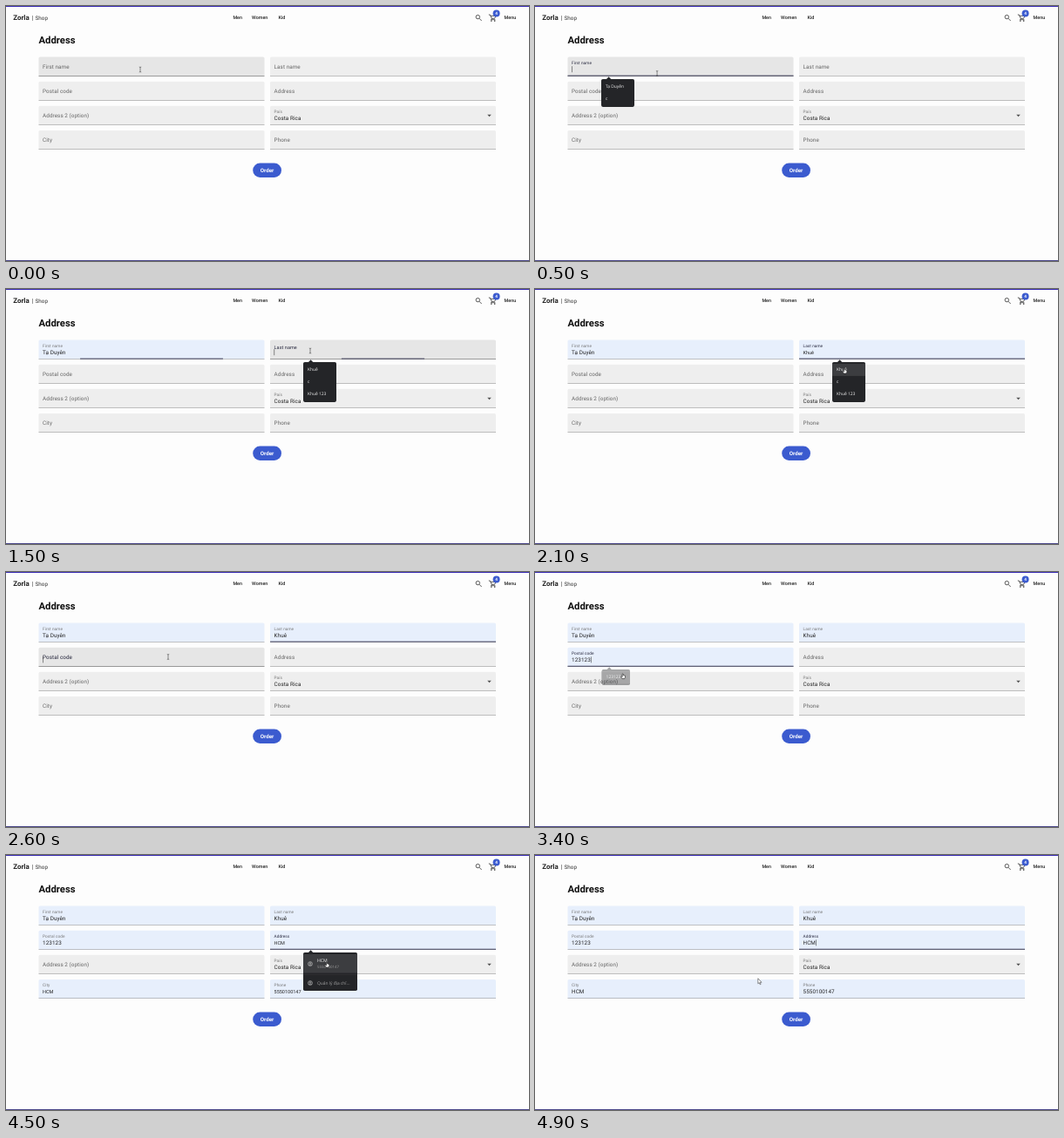
An HTML page that plays this animation: 600x293 px, repeating every 5 s.

```html
<!DOCTYPE html>
<html lang="en">
<head>
<meta charset="utf-8">
<title>Address form</title>
<style>
  html, body { margin: 0; width: 100%; height: 100%; overflow: hidden; background: #fdfdfd; }
  svg { display: block; width: 100%; height: 100%; text-rendering: geometricPrecision; }
  text { font-family: Roboto, Arial, sans-serif; white-space: pre; }
  .body { font-size: 6.3px; letter-spacing: .07px; }
  .preview { font-size: 5.5px; }
  .nav { font-size: 5.4px; font-weight: 500; fill: #222; }
  .menu text { font-family: "Open Sans", "Noto Sans", sans-serif; font-size: 4.9px; fill: #f1f1f1; }
</style>
</head>
<body>
<svg viewBox="0 0 600 293" xmlns="http://www.w3.org/2000/svg">
  <rect width="600" height="293" fill="#fdfdfd"/>
  <rect width="600" height="1" fill="#3a2db4"/>
  <rect y="292" width="600" height="1" fill="#4d4a8c"/>
  <text x="8.3" y="16.2" font-size="7.9" font-weight="700" fill="#222">Zorla</text>
  <text x="29.8" y="16" font-size="7" fill="#333">|</text>
  <text x="33.6" y="16" font-size="6.3" fill="#333">Shop</text>
  <g class="nav">
    <text x="260.4" y="15.4">Men</text>
    <text x="282" y="15.4">Women</text>
    <text x="312.6" y="15.4">Kid</text>
    <text x="571.6" y="15.4">Menu</text>
  </g>
  <g fill="none" stroke="#333" stroke-width=".8">
    <circle cx="541.3" cy="12.6" r="2.2"/>
    <path d="M543 14.3L545.7 17"/>
    <path d="M553.8 10H555.2L557.3 14.3H560.5L562 11.5M556 11.3H561M557.3 14.3L556.5 15.7H561.3"/>
  </g>
  <circle cx="556.8" cy="17.1" r=".8" fill="#333"/>
  <circle cx="560.7" cy="17.1" r=".8" fill="#333"/>
  <circle cx="562.6" cy="8.6" r="4" fill="#3b5bcf"/>
  <text x="562.6" y="10.3" font-size="4.7" font-weight="700" fill="#fff" text-anchor="middle">4</text>
  <text x="37.5" y="43" font-size="11.3" font-weight="700" fill="#111">Address</text>
  <g id="scene"></g>
  <rect x="283.2" y="180.6" width="32.8" height="16.4" rx="8.2" fill="#3b5bcf"/>
  <text x="299.6" y="190.9" font-size="6.2" font-weight="700" fill="#fff" text-anchor="middle">Order</text>
  <g id="overlay"></g>
</svg>
<script>
const LOOP = 5000, STEP = 100, NEVER = 1e9;
const WIDTH = 259, HEIGHT = 22, FLOAT = 150, RIPPLE = 180;
const scene = document.getElementById('scene');
const overlay = document.getElementById('overlay');

// Times: focus = click in, blur = click elsewhere, hint = suggestion hovered, fill = suggestion taken.
const field = (col, row, label, value = '', times = {}) => ({
  x: col ? 303 : 37.5, y: 58.5 + row * 28.15, label, value,
  focus: NEVER, blur: NEVER, hint: NEVER, fill: NEVER, ...times
});
const fields = [
  field(0, 0, 'First name', 'Tạ Duyên', { focus: 220, blur: 1446, hint: 900, fill: 1110 }),
  field(1, 0, 'Last name', 'Khuê', { focus: 1446, blur: 2598, hint: 1950, fill: 2210 }),
  field(0, 1, 'Postal code', '123123', { focus: 2598, blur: 3890, hint: 3150, fill: 3310 }),
  field(1, 1, 'Address', 'HCM', { focus: 3890, hint: 4350, fill: 4600 }),
  field(0, 2, 'Address 2 (option)'),
  field(1, 2, 'País', 'Costa Rica', { select: true }),
  field(0, 3, 'City', 'HCM', { hint: 4350, fill: 4600 }),
  field(1, 3, 'Phone', '5550100147', { hint: 4350, fill: 4600 })
];

const menu = (owner, x, w, items) => {
  const f = fields[owner];
  const h = items ? 4 + 14 * items.length : 44;
  return { x, y: f.y + 25.4, w, h, items, open: f.focus + 40, hint: f.hint, close: f.fill };
};
const menus = [
  menu(0, 76, 38, ['Tạ Duyên', 'c']),
  menu(1, 341, 38, ['Khuê', 'c', 'Khuê 123']),
  menu(2, 76.6, 32.4, ['123123']),
  menu(3, 341, 62, null)
];

// Pointer stops: time, x, y
const path = [
  [0, 154, 73], [300, 154, 73], [900, 100.3, 90.4], [1130, 100.3, 90.4],
  [1400, 349, 71], [1550, 349, 71], [1950, 355, 91], [2230, 355, 91],
  [2520, 186, 97.5], [2700, 186, 97.5], [3150, 100.7, 116.6], [3420, 100.7, 116.6],
  [3800, 341, 92], [4050, 341, 92], [4350, 368, 123], [4640, 368, 123],
  [4900, 255.8, 141.8], [5000, 255.8, 141.8]
];

const clamp = v => Math.max(0, Math.min(1, v));
const inside = (p, b, w, h) => p.x >= b.x && p.x <= b.x + w && p.y >= b.y && p.y <= b.y + h;

// cubic-bezier(.4, 0, .2, 1)
function ease(v) {
  v = clamp(v);
  let lo = 0, hi = 1, u = .5;
  for (let i = 0; i < 20; i++) {
    u = (lo + hi) / 2;
    const n = 1 - u;
    if (1.2 * n * n * u + .6 * n * u * u + u * u * u < v) lo = u; else hi = u;
  }
  return 3 * (1 - u) * u * u + u * u * u;
}

function pointerAt(t) {
  const i = Math.max(1, path.findIndex(k => k[0] > t));
  const [t0, x0, y0] = path[i - 1], [t1, x1, y1] = path[i];
  const k = clamp((t - t0) / (t1 - t0)), s = k * k * (3 - 2 * k);
  return { x: x0 + (x1 - x0) * s, y: y0 + (y1 - y0) * s };
}

const rect = (x, y, w, h, fill, more = '') =>
  `<rect x="${x}" y="${y}" width="${w}" height="${h}" fill="${fill}" ${more}/>`;
const text = (x, y, str, more = '') => `<text x="${x}" y="${y}" ${more}>${str}</text>`;

const measurer = document.createElement('canvas').getContext('2d');
function valueWidth(str) {
  measurer.font = '63px Roboto, Arial, sans-serif';
  return measurer.measureText(str).width / 10 + str.length * .07;
}

function drawField(f, t, hovered) {
  const { x, y } = f;
  const focused = t >= f.focus && t < f.blur;
  const filled = t >= f.fill, hinted = t >= f.hint && !filled;
  const bottom = y + HEIGHT;
  const box = `M${x} ${bottom}V${y + 1.6}q0 -1.6 1.6 -1.6H${x + WIDTH - 1.6}q1.6 0 1.6 1.6V${bottom}Z`;
  let out = `<path d="${box}" fill="${filled || hinted ? '#e7effc' : '#eeeeee'}"/>`;
  if (hovered) out += `<path d="${box}" fill="#000" opacity=".035"/>`;
  out += rect(x, bottom - .5, WIDTH, .5, hovered ? '#444' : '#888');

  const grow = ease((t - f.focus) / RIPPLE) * (1 - ease((t - f.blur) / RIPPLE));
  if (grow > .001) {
    const w = WIDTH * grow;
    out += rect(x + (WIDTH - w) / 2, bottom - .9, w, 1, '#41425c');
  }

  const up = f.select ? 1 : ease((t - Math.min(f.focus, f.hint)) / FLOAT);
  const tone = focused ? '#25263c' : up > .5 ? '#777' : '#666';
  out += `<g transform="translate(${x + 4.6} ${y + 13 - 4.9 * up}) scale(${1 - .25 * up})">`
    + text(0, 0, f.label, `class="body" fill="${tone}"`) + '</g>';

  if (filled || f.select) out += text(x + 4.6, y + 16.4, f.value, 'class="body" fill="#222"');
  else if (hinted) out += text(x + 4.6, y + 16.4, f.value, 'class="preview" fill="#222"');

  if (f.select) out += `<path d="M${x + 249.2} ${y + 10}h4.6l-2.3 2.4z" fill="#555"/>`;

  const since = t - (filled ? f.fill : f.focus);
  if (focused && !hinted && since % 1060 < 530) {
    const cx = x + 4.6 + (filled ? valueWidth(f.value) + .2 : 0);
    out += rect(cx, y + 10.7, .5, 7, '#222');
  }
  return out;
}

const personIcon = (x, y) =>
  `<g fill="none" stroke="#ccc" stroke-width=".6"><circle cx="${x}" cy="${y}" r="2.4"/>`
  + `<circle cx="${x}" cy="${y - .6}" r=".8"/><path d="M${x - 1.6} ${y + 1.6}q1.6 -1.4 3.2 0"/></g>`;

const menuAlpha = (m, t) => t < m.open ? (t >= m.open - 40 + 50 ? 1 : 0) : 1 - clamp((t - m.close) / 150);

function drawMenu(m, t) {
  const alpha = menuAlpha(m, t);
  if (alpha <= 0) return '';
  const { x, y, w, h } = m;
  let out = `<g class="menu" opacity="${alpha}">`
    + `<path d="M${x + 6} ${y}l2.6 -2.7l2.6 2.7z" fill="#242528"/>`
    + rect(x, y, w, h, '#242528', 'rx="1.8"');
  if (t >= m.hint) out += rect(x, y + 2, w, m.items ? 14 : 21.5, '#3c3d40');
  if (m.items) {
    m.items.forEach((s, i) => out += text(x + 5, y + 10.4 + 14 * i, s));
  } else {
    out += personIcon(x + 8, y + 13) + text(x + 16, y + 10.6, 'HCM', 'style="font-size:5.2px"')
      + text(x + 16, y + 18.2, '5550100147', 'style="font-size:4.4px;fill:#999"')
      + rect(x, y + 25.3, w, .4, '#3a3b3e')
      + personIcon(x + 8, y + 35) + text(x + 16, y + 36.8, 'Quản lý địa chỉ...', 'style="fill:#a5a5a5"');
  }
  return out + '</g>';
}

const cursors = {
  beam: '<path d="M-1.2 -3Q0 -3 0 -2.2Q0 -3 1.2 -3M0 -2.2V2.2M-1.2 3Q0 3 0 2.2Q0 3 1.2 3" fill="none" stroke="#333" stroke-width=".55"/>',
  hand: '<path d="M-.5 .4Q0 -.5 .5 .4V2L2.8 2.6V4.4L2 6H-.8L-2.2 3.7L-1.6 3.2L-.5 4Z" fill="#fff" stroke="#111" stroke-width=".55"/>',
  arrow: '<path d="M0 0V6L1.4 4.8L2.4 7L3.3 6.6L2.4 4.5H4.2Z" fill="#fff" stroke="#222" stroke-width=".5"/>'
};

function draw(t) {
  const p = pointerAt(t);
  const onMenu = menus.some(m => menuAlpha(m, t) > 0 && inside(p, m, m.w, m.h));
  const hot = onMenu ? null : fields.find(f => inside(p, f, WIDTH, HEIGHT));
  const kind = onMenu || (hot && hot.select) ? 'hand' : hot ? 'beam' : 'arrow';
  scene.innerHTML = fields.map(f => drawField(f, t, f === hot)).join('');
  overlay.innerHTML = menus.map(m => drawMenu(m, t)).join('')
    + `<g transform="translate(${p.x} ${p.y})">${cursors[kind]}</g>`;
}

const start = performance.now();
let shown = -1;
function tick() {
  const elapsed = Math.max(0, performance.now() - start) % LOOP;
  const t = Math.floor(elapsed / STEP) * STEP;
  if (t !== shown) draw(shown = t);
  requestAnimationFrame(tick);
}
tick();
</script>
</body>
</html>
```
